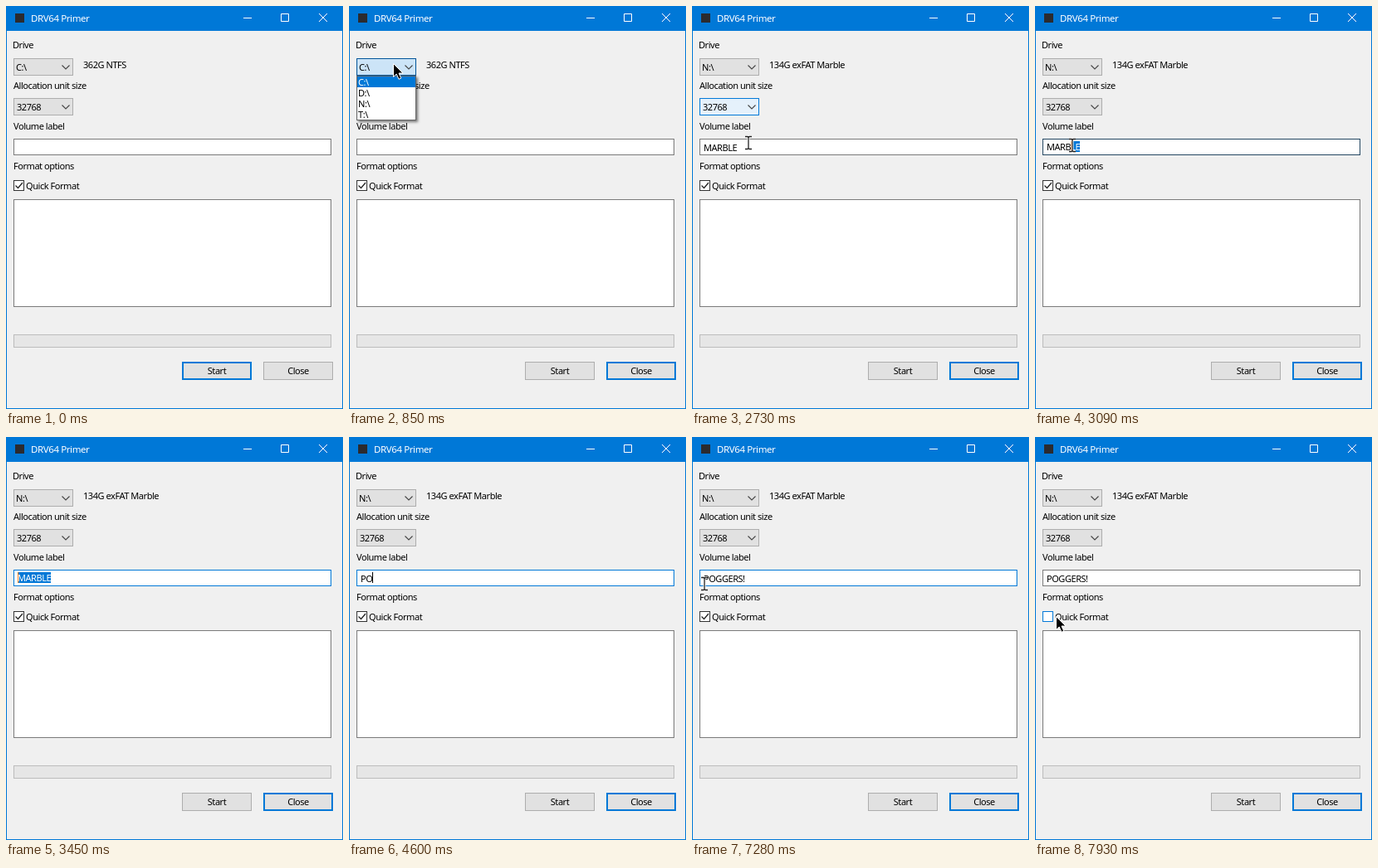
Write an HTML page that moves like this. It is 406x486 px and loops after 8000 ms.

```html
<!DOCTYPE html>
<html lang="en">
<head>
<meta charset="utf-8">
<title>Format dialog</title>
<style>
  html, body { margin: 0; width: 100%; height: 100%; overflow: hidden; }
  #win {
    position: relative; width: 406px; height: 486px; overflow: hidden;
    background: #f0f0f0; color: #000;
    font: 11px/15px "Noto Sans", "DejaVu Sans", sans-serif; letter-spacing: -.45px;
  }
  #win * { box-sizing: border-box; }
  .at { position: absolute; left: calc(var(--x) * 1px); top: calc(var(--y) * 1px); white-space: pre; }
  .box { width: calc(var(--w) * 1px); height: calc(var(--h) * 1px); border: 1px solid #7a7a7a; background: #fff; }
  .frame { inset: 0; position: absolute; border: 1px solid #0078d7; border-top-width: 30px; }
  .title { color: #fff; font-size: 11.5px; letter-spacing: -.4px; }
  .icon { width: 11px; height: 11px; background: #2b2b2f; }
  .combo { border-color: #adadad; background: #e1e1e1; }
  .bar { border-color: #bcbcbc; background: #e6e6e6; }
  .btn { border-color: #adadad; background: #e1e1e1; text-align: center; line-height: 20px; }
  .btn.main { border: 2px solid #0078d7; line-height: 18px; }
  #list { border-color: #646464; box-shadow: 2px 2px 3px rgba(0, 0, 0, .5); }
  #list div { height: 13px; line-height: 13px; padding-left: 1px; }
  #list .on { background: #0078d7; color: #fff; }
  #sel { display: inline-block; height: 13px; line-height: 13px; background: #0078d7; color: #fff; }
  #caret { position: absolute; width: 1px; height: 13px; margin-top: 1px; background: #000; }
  svg { position: absolute; left: 0; top: 0; overflow: visible; fill: none; }
</style>
</head>
<body>
<div id="win">
  <div class="frame"></div>
  <div class="at icon" style="--x:11;--y:9"></div>
  <div class="at title" style="--x:30;--y:7">DRV64 Primer</div>

  <div class="at" style="--x:8;--y:39">Drive</div>
  <div class="at box combo" id="drive" style="--x:9;--y:63;--w:72;--h:21"></div>
  <div class="at" id="driveText" style="--x:12;--y:66"></div>
  <div class="at" id="info" style="--x:93;--y:63"></div>

  <div class="at" style="--x:9;--y:88">Allocation unit size</div>
  <div class="at box combo" id="unit" style="--x:9;--y:111;--w:72;--h:21"></div>
  <div class="at" style="--x:13;--y:114">32768</div>

  <div class="at" style="--x:9;--y:137">Volume label</div>
  <div class="at box" id="field" style="--x:9;--y:160;--w:383;--h:20"></div>
  <div class="at" style="--x:14;--y:162"><span id="text"></span><i id="caret"></i><span id="sel"></span></div>

  <div class="at" style="--x:9;--y:185">Format options</div>
  <div class="at box" id="check" style="--x:9;--y:210;--w:13;--h:13"></div>
  <div class="at" style="--x:24;--y:209">Quick Format</div>

  <div class="at box" style="--x:9;--y:233;--w:383;--h:130"></div>
  <div class="at box bar" style="--x:9;--y:396;--w:383;--h:16"></div>
  <div class="at box btn" id="start" style="--x:212;--y:429;--w:84;--h:22">Start</div>
  <div class="at box btn" id="close" style="--x:310;--y:429;--w:84;--h:22">Close</div>

  <svg width="406" height="486">
    <path stroke="#fff" d="M286 14.5h10M331.5 9.5h9v9h-9zM377 9l10 10M387 9l-10 10"/>
    <path stroke="#444" stroke-width="1.1" d="M67.5 71.5l4.5 4.5 4.5-4.5M67.5 119.5l4.5 4.5 4.5-4.5"/>
    <path id="tick" stroke="#222" stroke-width="1.3" d="M11.5 216.5l3 3 5.5-6.5"/>
  </svg>

  <div class="at box" id="list" style="--x:9;--y:84;--w:72;--h:54"><div>C:\</div><div>D:\</div><div>N:\</div><div>T:\</div></div>

  <svg width="406" height="486">
    <path id="arrow" fill="#000" stroke="#fff" d="M.5 .5V16.5L4.2 13 7 19.3 9.8 18 7 12H12Z"/>
    <g id="beam">
      <path stroke="#fff" stroke-width="3" d="M-4 -7.5H4M-4 7.5H4M0 -7.5V7.5"/>
      <path stroke="#222" stroke-width="1.3" d="M-4 -7.5H-1L0 -6.5 1 -7.5H4M-4 7.5H-1L0 6.5 1 7.5H4M0 -6.5V6.5"/>
    </g>
  </svg>
</div>
<script>
const LOOP = 8000;
const $ = id => document.getElementById(id);
const rgb = hex => [1, 3, 5].map(i => parseInt(hex.slice(i, i + 2), 16));

const GREY = rgb("#adadad"), FACE = rgb("#e1e1e1");
const BLUE = rgb("#0078d7"), HOVER = rgb("#e5f1fb");
const NAVY = rgb("#005499"), PRESS = rgb("#cce4f7");
const EDGE = rgb("#7a7a7a"), DARK = rgb("#333333"), WHITE = rgb("#ffffff");

// Rows of [time, value...], blended linearly
const pointer = [
  [310, 1, 100], [700, 52, 71], [790, 53, 69], [1160, 53, 69], [1220, 53, 73],
  [1580, 48, 118], [2370, 48, 118], [2430, 49, 121], [2640, 62, 156], [2730, 68, 165],
  [2970, 57, 168], [3390, 14, 168], [7180, 14, 168], [7330, 16, 182],
  [7510, 23, 212], [7630, 25, 218], [7870, 25, 216]
];
const driveLook = [
  [560, ...GREY, ...FACE], [700, ...BLUE, ...HOVER], [790, ...NAVY, ...PRESS],
  [2010, ...NAVY, ...PRESS], [2250, ...GREY, ...FACE]
];
const unitLook = [
  [2010, ...GREY, ...FACE], [2250, ...BLUE, ...HOVER],
  [2730, ...BLUE, ...HOVER], [2970, ...GREY, ...FACE]
];
const fieldLook = [
  [2730, ...EDGE, ...WHITE], [2910, ...DARK, ...WHITE], [2970, ...DARK, ...WHITE],
  [3390, ...BLUE, ...WHITE], [7690, ...BLUE, ...WHITE], [7870, ...EDGE, ...WHITE]
];
const checkLook = [
  [7450, ...DARK, ...WHITE], [7570, ...BLUE, ...WHITE], [7690, ...NAVY, ...PRESS],
  [7750, ...NAVY, ...PRESS], [7870, ...BLUE, ...WHITE]
];

// Rows of [time, value], held until the next
const typed = [
  [0, ""], [2010, "MARBLE"], [4250, "P"], [4600, "PO"], [4720, "POG"], [4840, "POGG"],
  [5010, "POGGE"], [5070, "POGGER"], [5800, "POGGERS"], [6290, "POGGERS!"]
];
const caretOn = [[0, 0], [2970, 1], [4070, 0], [4250, 1], [5620, 0], [5860, 1], [6840, 0]];
const shape = [[0, ""], [310, "arrow"], [2640, "beam"], [3450, ""], [7240, "beam"], [7330, "arrow"]];

function blend(rows, t) {
  const i = rows.findIndex(r => r[0] > t);
  if (i === 0) return rows[0].slice(1);
  if (i < 0) return rows[rows.length - 1].slice(1);
  const a = rows[i - 1], b = rows[i], k = (t - a[0]) / (b[0] - a[0]);
  return a.slice(1).map((v, j) => v + (b[j + 1] - v) * k);
}
const hold = (rows, t) => rows.filter(r => r[0] <= t).pop()[1];
const show = (id, on) => { $(id).style.visibility = on ? "visible" : "hidden"; };

function paint(id, rows, t) {
  const c = blend(rows, t).map(Math.round), s = $(id).style;
  s.borderColor = `rgb(${c.slice(0, 3)})`;
  s.backgroundColor = `rgb(${c.slice(3)})`;
}

function draw(t) {
  paint("drive", driveLook, t);
  paint("unit", unitLook, t);
  paint("field", fieldLook, t);
  paint("check", checkLook, t);

  const chosen = t >= 2010;
  $("driveText").textContent = chosen ? "N:\\" : "C:\\";
  $("info").textContent = chosen ? "134G exFAT Marble" : "362G NTFS";
  $("start").classList.toggle("main", t < 790);
  $("close").classList.toggle("main", t >= 790);

  const [x, y] = blend(pointer, t);
  const row = Math.max(0, Math.floor((y - 85) / 13));
  show("list", t >= 790 && !chosen);
  [...$("list").children].forEach((item, i) => item.classList.toggle("on", i === row));

  // Selection is dragged from the end of the word to its start
  const word = hold(typed, t);
  const dragging = t >= 2970 && t < 4250;
  const cut = dragging ? Math.max(0, Math.round(word.length * (x - 14) / 43)) : word.length;
  $("text").textContent = word.slice(0, cut);
  $("sel").textContent = word.slice(cut);
  $("caret").style.background = cut < word.length ? "#ff8728" : "#000";
  show("caret", hold(caretOn, t));
  show("tick", t < 7750);

  const kind = hold(shape, t);
  for (const id of ["arrow", "beam"]) {
    show(id, id === kind);
    $(id).setAttribute("transform", `translate(${Math.round(x)} ${Math.round(y)})`);
  }
}

const begin = performance.now();
function tick() {
  draw((performance.now() - begin) % LOOP);
  requestAnimationFrame(tick);
}
tick();
</script>
</body>
</html>
```
